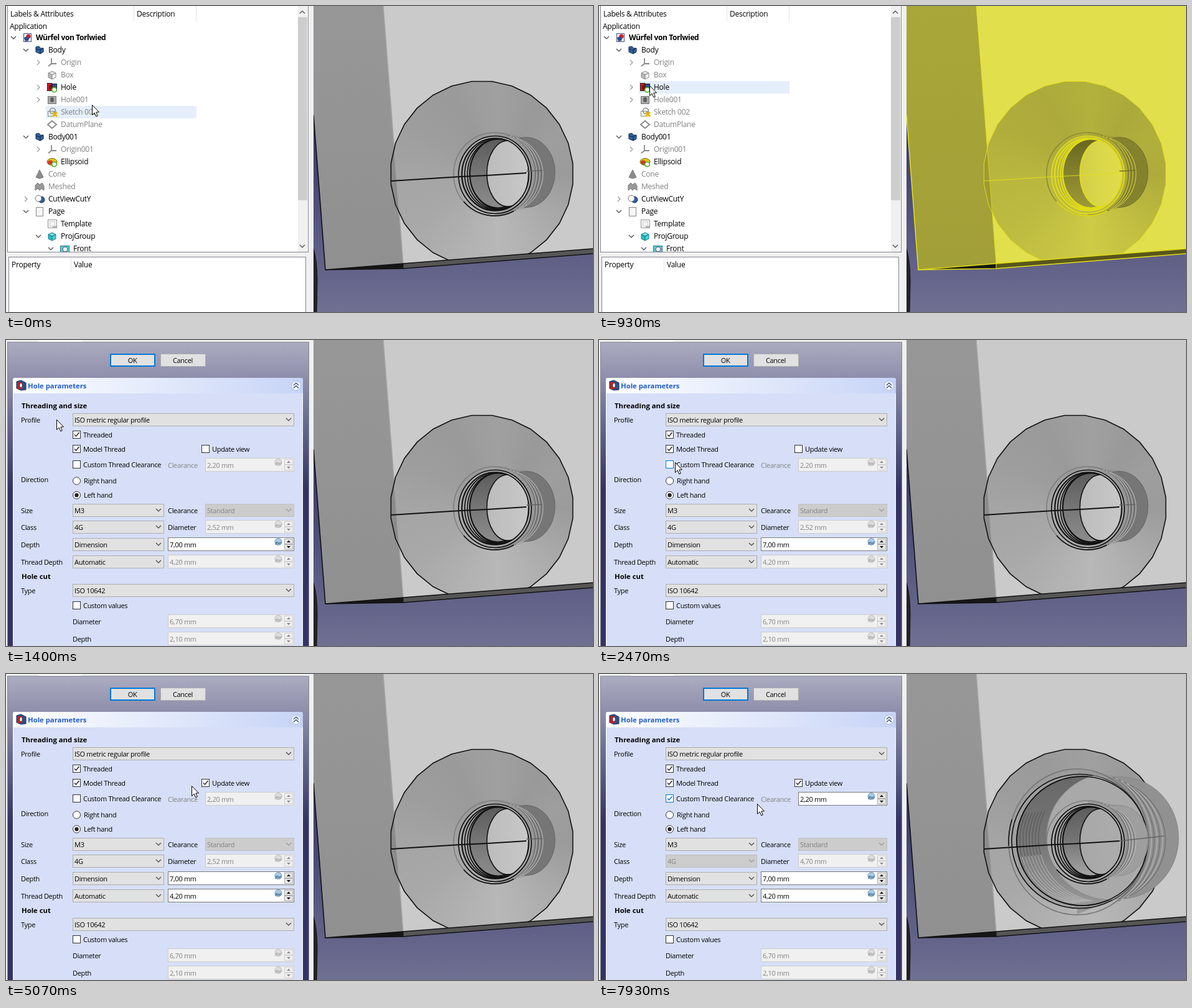
Write an HTML page with a canvas that moves like this. It is 943 by 493 pixels and loops after 8 s.

```html
<!DOCTYPE html>
<html lang="en">
<head>
<meta charset="utf-8">
<title>Hole parameters</title>
<style>
html, body { margin: 0; width: 100%; height: 100%; overflow: hidden; background: #f0f0f0; }
canvas { display: block; }
</style>
</head>
<body>
<canvas id="stage" width="943" height="493"></canvas>
<script>
const g = document.getElementById('stage').getContext('2d');
const LOOP = 8000, TICK = 1000 / 15;
const TREE = { font: '12px "Open Sans", sans-serif', gap: '-0.25px' };
const TREE_BOLD = { font: 'bold 12px "Open Sans", sans-serif', gap: '-0.4px' };
const FORM = { font: '11px "Open Sans", sans-serif', gap: '-0.3px' };
const FORM_BOLD = { font: 'bold 11.3px "Open Sans", sans-serif', gap: '0px' };

function paint(fill, stroke, width = 1) {
  if (fill) { g.fillStyle = fill; g.fill(); }
  if (stroke) { g.strokeStyle = stroke; g.lineWidth = width; g.stroke(); }
}
function trace(points, close = true) {
  g.beginPath();
  points.forEach(([x, y]) => g.lineTo(x, y));
  if (close) g.closePath();
}
function poly(points, fill, stroke, width) { trace(points); paint(fill, stroke, width); }
function line(points, stroke, width) { trace(points, false); paint(null, stroke, width); }
function rect(x, y, w, h, fill, stroke) {
  if (fill) { g.fillStyle = fill; g.fillRect(x, y, w, h); }
  if (stroke) { g.strokeStyle = stroke; g.lineWidth = 1; g.strokeRect(x + .5, y + .5, w - 1, h - 1); }
}
function oval(x, y, rx, ry, fill, stroke, width, from = 0, to = 360) {
  g.beginPath();
  g.ellipse(x, y, rx, ry, 0, from * Math.PI / 180, to * Math.PI / 180);
  paint(fill, stroke, width);
}
function text(s, x, y, style = FORM, color = '#000', align = 'left') {
  g.font = style.font;
  g.letterSpacing = style.gap;
  g.textAlign = align;
  g.fillStyle = color;
  g.fillText(s, x, y + 4);
}
function gradient(x0, y0, x1, y1, ...stops) {
  const fill = g.createLinearGradient(x0, y0, x1, y1);
  stops.forEach((c, i) => fill.addColorStop(i / (stops.length - 1), c));
  return fill;
}
function chevron(x, y, dx, dy, color = '#444') {
  // (dx, dy) is the direction it points to
  line([[x - 4 * dy - 2 * dx, y - 4 * dx - 2 * dy], [x + 2 * dx, y + 2 * dy],
    [x + 4 * dy - 2 * dx, y + 4 * dx - 2 * dy]], color, 1.2);
}

// ---- 3D view ----
const looks = {
  plain: { ink: '#111', tone: v => `rgb(${v},${v},${v})` },
  hover: { ink: '#e2de14', tone: v => `rgb(${v * 1.12},${v * 1.105},${v * .38})` },
  picked: { ink: '#1fb21f', tone: v => `rgb(${v * .77 + 20},${v * .9 + 28},${v * .77 + 20})` }
};

function boreSmall(tone, ink, faint) {
  const rear = faint ? 158 : 118;
  poly([[785, 204], [836, 212], [836, 325], [785, 338]], tone(faint ? 150 : 140));
  oval(836, 268, 46, 56.5, tone(rear), tone(rear - 18));
  oval(785, 271, 66, 67, tone(152), null, 1, -90, 90);
  oval(785, 271, 66, 67, null, tone(125), 1.5);
  for (let i = 0; i < 6; i++)
    oval(792 + i * 2.5, 271, 58, 65 - i, null, tone(i % 2 ? 182 : 112), 1.2, -75, 75);
  oval(785.5, 272, 58.5, 62.5, tone(170), ink, 1.7);
  oval(785, 271, 66, 67, null, ink, 1.7, 62, 139);
  g.save();
  oval(786, 271.5, 54, 58.5);
  g.clip();
  for (let i = 0; i < 4; i++)
    oval(786.5 + i * 1.6, 271.3, 54 - i * 2.8, 58.5 - i * .9, tone(165), ink, 1.7);
  oval(790.5, 270, 45.5, 55.5, gradient(0, 215, 0, 325, tone(92), tone(118), tone(faint ? 165 : 140)), ink, 2.2);
  oval(806, 270, 33.5, 53, gradient(773, 0, 840, 0, tone(faint ? 168 : 188), tone(faint ? 172 : 200)), ink, 1.6);
  g.restore();
  oval(786, 271.5, 54, 58.5, null, ink, 1.6);
}

function boreLarge(tone, ink) {
  poly([[768, 154], [845, 166], [838, 360], [768, 387]], tone(152));
  oval(838, 264, 93, 98, tone(145), tone(132));
  for (let i = 0; i < 7; i++)
    oval(774 + i * 4.5, 268, 109, 116 - i * 2.4, null, tone(i % 2 ? 182 : 108), 1.2, -62, 62);
  oval(768, 270.5, 110, 117.5, null, tone(115), 1.5);
  oval(768, 270.5, 110, 117.5, null, ink, 1.6, 177, 198);
  oval(772, 269.5, 109, 108, tone(160), ink, 1.7);
  g.save();
  g.clip();
  oval(776, 269, 105, 104, gradient(0, 165, 0, 375, tone(104), tone(118), tone(152)), ink, 1.6);
  for (let i = 0; i < 7; i++) {
    oval(781 + i * 5, 268 - i * .6, 105, 103, null, tone(84), 1, 150, 205);
    oval(781 + i * 5, 268 - i * .6, 105, 103, null, tone(192), 1, 100, 165);
  }
  oval(822, 262, 103, 102, tone(169), tone(135));
  for (let i = 0; i < 5; i++)
    oval(790 + i * 5, 268, 84, 102, null, tone(188), 1, 18, 60);
  g.restore();
  oval(776, 269, 105, 104, null, ink, 1.6);
}

function view(look, enlarged) {
  const { tone, ink } = looks[look];
  g.save();
  g.beginPath();
  g.rect(494, 0, 449, 493);
  g.clip();
  rect(494, 0, 449, 493, gradient(0, 175, 0, 493, '#343468', '#707093'));
  g.beginPath();
  g.moveTo(490, 382);
  g.quadraticCurveTo(500, 400, 500, 445);
  g.lineTo(499, 493);
  g.lineTo(490, 493);
  paint('#242428', '#111');

  const faces = [[494, 0], [943, 0], [943, 391], [638, 415], [513, 425], [494, 176]];
  poly(faces, tone(202));
  poly([[494, 0], [606, 0], [638, 415], [513, 425], [494, 176]], gradient(0, 0, 0, 425, tone(151), tone(144)));

  g.save();
  trace(faces);
  g.clip();
  const cone = g.createConicGradient(0, 790, 272);
  [155, 166, 176, 184, 176, 168, 165, 157, 154, 160, 153, 158, 155]
    .forEach((v, i) => cone.addColorStop(i / 12, tone(v)));
  const rim = Array.from({ length: 28 }, (_, i) => {
    const a = (i + .5) * Math.PI / 14;
    return [764.5 + 147 * Math.cos(a), 270.5 + 150 * Math.sin(a)];
  });
  poly(rim, cone);
  g.save();
  g.clip();
  poly([[600, 0], [606, 0], [638, 415], [600, 415]], tone(139));
  g.restore();
  line([[606, 0], [638, 415]], look === 'plain' ? tone(165) : ink, look === 'plain' ? 1.5 : .7);
  poly(rim, null, ink, look === 'hover' ? 1 : 1.6);
  g.restore();

  if (enlarged) boreLarge(tone, ink);
  boreSmall(tone, ink, enlarged);
  line(enlarged ? [[836, 269], [908, 261]] : [[836, 266], [862, 265]], tone(100), 1.4);
  line([[618, 282], [729, 275], [772, 273], [836, 269]], ink, look === 'hover' ? 1 : 1.8);

  poly([[513, 425], [638, 415], [638, 423]], '#161616');
  poly([[638, 415], [943, 391], [943, 399], [638, 423]], look === 'hover' ? '#58561c' : look === 'picked' ? '#40503f' : '#565656');
  line([[494, 176], [513, 425], [638, 415], [943, 391]], ink, 1.6);
  line([[513, 425], [638, 423], [943, 399]], ink, 1.6);
  line([[638, 415], [638, 423]], ink, 1);
  g.restore();
}

// ---- Tree panel ----
const cube = (top, left, right, edge) => {
  poly([[-6, -3], [0, -6], [6, -3], [0, 0]], top, edge);
  poly([[-6, -3], [0, 0], [0, 7], [-6, 4]], left, edge);
  poly([[6, -3], [0, 0], [0, 7], [6, 4]], right, edge);
};
const badge = () => { oval(3.5, 4, 3.8, 3.8, '#fff', '#4caf22', 1.6); };
const icons = {
  doc() {
    rect(-6, -7, 13, 14, '#f2f4fa', '#44517c');
    oval(2, -2, 3.6, 3.6, '#c8202c');
    poly([[-5, 0], [-1, -2], [3, 1], [2, 5], [-3, 6]], '#2a4c8d');
  },
  body() { poly([[-6, -5], [-1, -6], [1, -3], [6, -3], [6, 3], [1, 6], [-6, 3]], '#3465a4', '#0b1f40'); line([[-6, -2], [1, 0], [6, -3]], '#0b1f40'); line([[1, 0], [1, 6]], '#0b1f40'); },
  origin() { line([[-1, -7], [-1, 2], [7, 2]], '#888', 1.8); line([[-1, 2], [-6, 6]], '#888', 1.8); },
  box() { cube('#e3e3e3', '#b9b9b9', '#f1f1f1', '#8a8a8a'); },
  hole() { rect(-8, -7, 8, 13, '#c91f24', '#361116'); rect(0, -6, 8, 12, '#28538f', '#122544'); oval(-2, 0, 3, 4, '#781015'); badge(); },
  oldHole() { rect(-7, -6, 14, 13, '#a9a9a9', '#777'); oval(0, 0, 3, 4, '#5d5d5d'); },
  sketch() { rect(-7, -2, 11, 9, null, '#888'); oval(1, -2, 4.5, 4.5, null, '#888', 1.6); line([[1, 0], [8, 7]], '#e4b800', 3); line([[8, 0], [1, 7]], '#e4b800', 3); },
  datum() { poly([[-7, 0], [0, -6], [7, 0], [0, 6]], null, '#8a8a8a', 2); },
  ellipsoid() { oval(0, 0, 8, 5.5, '#e9c51c', '#56701c'); oval(-3, 1, 4, 3.5, '#d53b21'); badge(); },
  cone() { poly([[0, -7], [6, 5], [0, 7], [-6, 5]], '#8c8c8c', '#777'); },
  mesh() { poly([[-7, -2], [-3, -6], [0, -3], [4, -6], [7, -1], [7, 6], [3, 3], [0, 6], [-3, 3], [-7, 6]], '#999', '#777'); },
  cut() { oval(3, 1, 5, 5, '#315f9e', '#16315b'); oval(-2, -1, 5, 5, '#fff', '#777'); },
  page() { rect(-6, -7, 12, 15, '#f6f6f6', '#888'); },
  template() { rect(-7, -7, 15, 14, '#f5f5f5', '#999'); g.setLineDash([1, 2]); rect(-4, -4, 9, 8, null, '#888'); g.setLineDash([]); rect(1, 3, 6, 3, '#bbb'); },
  group() { cube('#73e2ea', '#2cbdc9', '#4bd2dc', '#177c86'); },
  front() { rect(-7, -5, 15, 12, '#55d3dc', '#227880'); oval(1, 1, 4, 4, '#eee', '#557'); }
};
// depth, icon, label, arrow (v open, > closed), dimmed
const rows = [
  [1, 'doc', 'Würfel von Torlwied', 'v'], [2, 'body', 'Body', 'v'],
  [3, 'origin', 'Origin', '>', 1], [3, 'box', 'Box', '', 1], [3, 'hole', 'Hole', '>'],
  [3, 'oldHole', 'Hole001', '>', 1], [3, 'sketch', 'Sketch 002', '', 1], [3, 'datum', 'DatumPlane', '', 1],
  [2, 'body', 'Body001', 'v'], [3, 'origin', 'Origin001', '>', 1], [3, 'ellipsoid', 'Ellipsoid', ''],
  [2, 'cone', 'Cone', '', 1], [2, 'mesh', 'Meshed', '', 1], [2, 'cut', 'CutViewCutY', '>'],
  [2, 'page', 'Page', 'v'], [3, 'template', 'Template', ''], [3, 'group', 'ProjGroup', 'v'], [4, 'front', 'Front', 'v']
];

function treePanel(t, hoverRow) {
  const picked = t >= 1070;
  rect(0, 0, 494, 493, '#f0f0f0');
  rect(2, -1, 484, 398, '#fff', '#828790');
  rect(469, 0, 15, 396, '#f0f0f0');
  rect(469, 18, 15, 295, '#cdcdcd');
  chevron(476, 10, 0, -1);
  chevron(476, 387, 0, 1);
  text('Labels & Attributes', 7, 13, TREE);
  text('Description', 210, 13, TREE);
  rect(205, 0, 1, 24, '#e2e2e2');
  rect(305, 0, 1, 24, '#e2e2e2');
  text('Application', 6, 33, TREE);

  g.save();
  g.beginPath();
  g.rect(3, 24, 466, 372);
  g.clip();
  const top = 42 + 20 * hoverRow - 1;
  rect(64, top, 242, 20, picked ? '#cce8ff' : '#e5effb', picked ? '#99d1ff' : null);
  if (picked) {
    g.setLineDash([1, 1]);
    rect(64, top, 141, 20, null, '#222');
    g.setLineDash([]);
  }
  rows.forEach(([depth, icon, label, arrow, dim], i) => {
    const x = 14 + 20 * depth, y = 51 + 20 * i;
    if (arrow === 'v') chevron(x - 22, y, 0, 1);
    if (arrow === '>') chevron(x - 22, y, 1, 0, '#999');
    g.save();
    g.translate(x, y);
    icons[icon]();
    g.restore();
    text(label, x + 14, y, i ? TREE : TREE_BOLD, dim ? '#808080' : '#000');
  });
  g.restore();

  rect(4, 404, 478, 100, '#fff', '#828790');
  text('Property', 9, 417, TREE);
  text('Value', 109, 417, TREE);
  rect(104, 405, 1, 23, '#e2e2e2');
  if (t < 1130) return;
  rect(5, 429, 476, 19, '#a0a0a0');
  text('Display Options', 28, 439, TREE_BOLD, '#fff');
  text('Visibility', 28, 459, TREE);
  text('true', 108, 459, TREE);
  rect(5, 469, 476, 19, '#a0a0a0');
  text('Selection', 28, 479, TREE_BOLD, '#fff');
  rect(104, 449, 1, 19, '#dcdcdc');
  rect(104, 489, 1, 4, '#dcdcdc');
  rect(5, 448, 476, 1, '#dcdcdc');
}

// ---- Task panel ----
function combo(label, x, y, w, off) {
  rect(x, y - 10, w, 21, off ? '#ccc' : '#e1e1e1', off ? '#bfbfbf' : '#adadad');
  text(label, x + 3, y + 1, FORM, off ? '#838383' : '#000');
  chevron(x + w - 9, y, 0, 1, off ? '#999' : '#444');
}
function spin(label, x, y, on) {
  rect(x, y - 11, 463 - x, 22, on ? '#fff' : '#f0f0f0', on ? '#7a7a7a' : '#ccc');
  text(label, x + 3, y + 1, FORM, on ? '#000' : '#838383');
  oval(437.5, y - 4, 5.5, 5.5, on ? '#a9c9e6' : '#dcdcdc', on ? '#6e9cc6' : '#bdbdbd');
  text('f(x)', 437.5, y - 4.5, { font: 'italic bold 6px "Open Sans", sans-serif', gap: '0px' }, on ? '#20507e' : '#999', 'center');
  for (const dir of [-1, 1]) {
    const cy = y + dir * 4.5;
    rect(447, dir < 0 ? y - 9 : y, 14, 9, on ? '#e6e6e6' : '#f0f0f0', on ? '#adadad' : '#d0d0d0');
    poly([[451, cy - dir * 1.5], [457, cy - dir * 1.5], [454, cy + dir * 1.8]], on ? '#000' : '#888');
  }
}
function check(label, x, y, ticked, state) {
  const edge = { hover: '#0078d7', press: '#00549a' }[state] || '#333';
  rect(x, y - 6, 13, 13, state === 'press' ? '#cce4f7' : '#fff', edge);
  if (ticked) line([[x + 3, y + .5], [x + 5.5, y + 3], [x + 10.5, y - 3]], state ? edge : '#222', 1.4);
  text(label, x + 17, y + 1);
}
function radio(label, y, on) {
  oval(113.5, y, 6, 6, '#fff', '#333');
  if (on) oval(113.5, y, 3.2, 3.2, '#222');
  text(label, 125, y);
}
function button(label, x, main) {
  rect(x, 22, 73, 21, '#e1e1e1', main ? '#0078d7' : '#adadad');
  if (main) rect(x + 1, 23, 71, 19, null, '#0078d7');
  text(label, x + 36, 33, FORM, '#000', 'center');
}

function taskPanel(t, [mx, my]) {
  const clear = t >= 7070, deep = t >= 4530;
  rect(0, 0, 494, 493, '#f0f0f0');
  rect(51, 0, 71, 3, '#fff');
  rect(2, 3, 485, 500, gradient(0, 4, 0, 240, 'rgb(171,171,193)', 'rgb(51,51,101)'), '#828790');
  button('OK', 167, true);
  button('Cancel', 248);
  rect(11, 85, 466, 420, '#d6dff7', '#fff');
  g.beginPath();
  g.roundRect(11, 61, 466, 25, [3, 3, 0, 0]);
  paint(gradient(11, 0, 477, 0, '#fff', 'rgb(199,212,247)'));
  poly([[17, 67], [24, 65], [32, 69], [32, 80], [24, 81], [17, 78]], '#28538f', '#15284a');
  rect(18, 68, 8, 11, '#c91f24');
  oval(24, 73, 2.5, 4, '#eee', '#551015');
  text('Hole parameters', 35, 74, FORM_BOLD, '#215dc6');
  oval(466, 73.5, 7.5, 7.5, '#fff', '#9fb3dd');
  chevron(466, 71, 0, -1, '#1b3b88');
  chevron(466, 75.5, 0, -1, '#1b3b88');

  text('Threading and size', 25, 106, FORM_BOLD);
  text('Hole cut', 25, 381, FORM_BOLD);
  [['Profile', 129], ['Direction', 225], ['Size', 275], ['Class', 302], ['Depth', 330], ['Thread Depth', 358], ['Type', 404]]
    .forEach(([label, y]) => text(label, 24, y));
  text('Clearance', 260, 202, FORM, '#838383');
  text('Clearance', 260, 275);
  text('Diameter', 260, 302);
  text('Diameter', 107, 454);
  text('Depth', 107, 482);

  combo('ISO metric regular profile', 107, 128, 356);
  const overView = mx >= 314 && mx < 395 && my >= 168 && my < 184;
  const overClear = mx >= 107 && mx < 248 && my >= 193 && my < 209;
  const press = (from, to) => t >= from && t < to;
  check('Threaded', 107, 152, true);
  check('Model Thread', 107, 175, true);
  check('Update view', 314, 175, t >= 3730, press(3600, 3730) ? 'press' : overView && 'hover');
  check('Custom Thread Clearance', 107, 200, clear, press(6200, 7070) ? 'press' : (overClear || clear) && 'hover');
  spin('2,20 mm', 320, 201, clear);
  radio('Right hand', 227, false);
  radio('Left hand', 250, true);
  combo('M3', 107, 274, 147);
  combo('Standard', 320, 274, 143, true);
  combo('4G', 107, 301, 147, clear);
  spin(clear ? '4,70 mm' : '2,52 mm', 320, 301, false);
  combo('Dimension', 107, 329, 147);
  spin('7,00 mm', 260, 329, true);
  combo('Automatic', 107, 357, 147);
  spin('4,20 mm', 260, 357, deep);
  combo('ISO 10642', 107, 403, 356);
  check('Custom values', 107, 427, false);
  spin('6,70 mm', 260, 453, false);
  spin('2,10 mm', 260, 481, false);
}

// ---- Pointer ----
const path = [
  [0, 138, 159], [200, 118, 140], [330, 92, 116], [430, 82, 120], [530, 81, 128],
  [2000, 81, 128], [2530, 127, 206], [2670, 127, 206], [2800, 140, 210], [3330, 319, 182], [3530, 319, 179],
  [3660, 321, 178], [5000, 321, 178], [5660, 98, 200], [5730, 88, 202], [5870, 108, 202],
  [6200, 117, 201], [7730, 117, 201], [7930, 254, 209], [LOOP, 254, 209]
];
function pointerAt(t) {
  const q = Math.floor((t + 5) / TICK) * TICK;
  const i = Math.max(1, path.findIndex(p => p[0] >= q));
  const [a, b] = [path[i - 1], path[i]];
  const k = Math.min(1, (q - a[0]) / (b[0] - a[0]));
  return [1, 2].map(n => Math.round(a[n] + (b[n] - a[n]) * k));
}
function pointer([x, y]) {
  g.save();
  g.translate(x + .5, y + .5);
  poly([[0, 0], [0, 16], [3.7, 12.6], [6.3, 18.5], [8.8, 17.4], [6.3, 11.6], [11, 11.4]], '#fff', '#000');
  g.restore();
}

function draw() {
  const t = performance.now() % LOOP;
  const mouse = pointerAt(t);
  const look = t >= 930 && t < 1070 ? 'hover' : t >= 1070 && t < 1400 ? 'picked' : 'plain';
  if (t < 1330) treePanel(t, t < 66 ? 6 : Math.round((mouse[1] - 51) / 20));
  else taskPanel(t, mouse);
  view(look, t >= 7130);
  pointer(mouse);
  requestAnimationFrame(draw);
}
draw();
</script>
</body>
</html>
```
